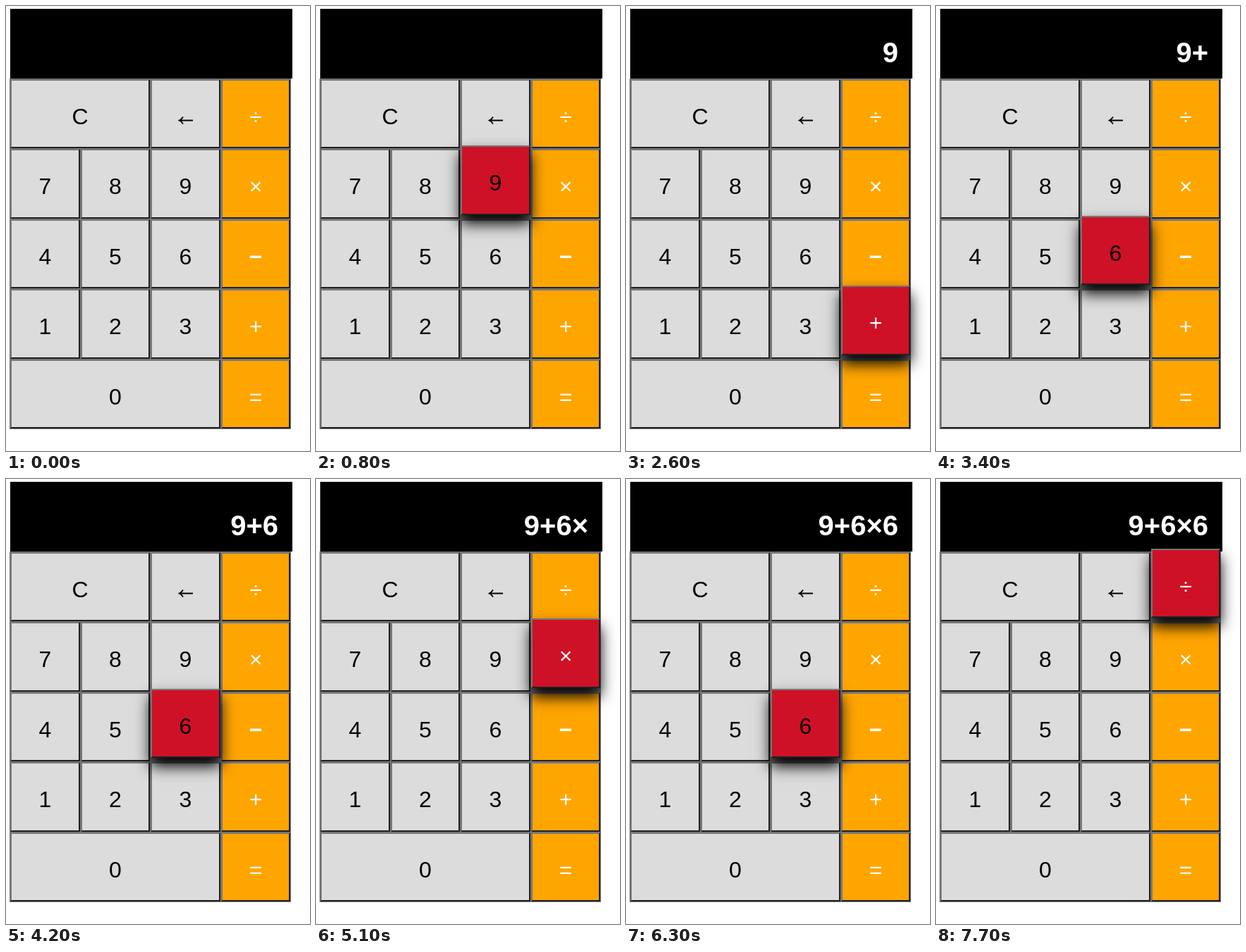
An HTML page for the animation above (8 s loop, 431x632 px).

```html
<!DOCTYPE html>
<html lang="en">
<head>
<meta charset="utf-8">
<title>Calculator</title>
<style>
  html, body { margin: 0; width: 100%; height: 100%; overflow: hidden; background: #fff; }
  body { position: relative; font-family: "Liberation Sans", Arial, sans-serif; }
  #screen {
    position: absolute; left: 6px; top: 4px; width: 380px; height: 99px; padding-right: 20px;
    background: #000; color: #fff; font-size: 40px; font-weight: bold; line-height: 124px; text-align: right;
  }
  #pad { position: absolute; left: 5px; top: 103px; width: 399px; height: 498px; background: #767676; }
  .key {
    position: absolute; box-sizing: border-box; border: 2px outset rgb(118, 118, 118);
    background: #dcdcdc; color: #000; font-size: 32px; line-height: 102px; text-align: center; white-space: nowrap;
  }
  .op { background: #ffa500; color: #fff; }
  .bold { font-weight: bold; }
  .hover { z-index: 1; background: #ce1126; transform: translateY(-5px); box-shadow: 0 12px 20px #000; }
  .press { border-style: inset; }
  .key svg { position: absolute; left: 37px; top: 49px; }
</style>
</head>
<body>
<div id="screen"></div>
<div id="pad"></div>
<script>
const LOOP = 8000;
const colStart = [6, 106, 205, 305], colEnd = [105, 204, 304, 403];
const rowStart = [104, 203, 303, 402, 502], rowEnd = [202, 302, 401, 501, 600];
const rows = ["CC←÷", "789×", "456−", "123+", "000="];
const arrow = '<svg width="22" height="15" fill="none" stroke="#000" stroke-width="1.8">' +
  '<path d="M1.5 7.5H21M7 2.5Q5 6 1.5 7.5Q5 9 7 12.5"/></svg>';

// time, hovered key, pressed, screen text
const steps = [
  [0, "", 0, ""],
  [500, "+", 0, ""],
  [600, "−", 0, ""],
  [800, "9", 0, ""],
  [1900, "9", 1, ""],
  [2000, "9", 0, "9"],
  [2300, "6", 0, "9"],
  [2400, "−", 0, "9"],
  [2600, "+", 0, "9"],
  [3000, "+", 1, "9"],
  [3100, "+", 0, "9+"],
  [3400, "6", 0, "9+"],
  [4100, "6", 1, "9+"],
  [4200, "6", 0, "9+6"],
  [4700, "×", 0, "9+6"],
  [5000, "×", 1, "9+6"],
  [5100, "×", 0, "9+6×"],
  [5300, "−", 0, "9+6×"],
  [5400, "6", 0, "9+6×"],
  [6100, "6", 1, "9+6×"],
  [6300, "6", 0, "9+6×6"],
  [7500, "×", 0, "9+6×6"],
  [7700, "÷", 0, "9+6×6"]
];

const screenBox = document.getElementById("screen");
const pad = document.getElementById("pad");
const keys = {};

rows.forEach((row, r) => {
  for (const label of new Set(row)) {
    const left = colStart[row.indexOf(label)], right = colEnd[row.lastIndexOf(label)];
    const key = document.createElement("div");
    key.className = "key" + ("÷×−+=".includes(label) ? " op" : "") + (label === "−" ? " bold" : "");
    Object.assign(key.style, {
      left: left - 5 + "px", top: rowStart[r] - 103 + "px",
      width: right - left + "px", height: rowEnd[r] - rowStart[r] + "px"
    });
    if (label === "←") key.innerHTML = arrow;
    else key.textContent = label;
    pad.append(key);
    keys[label] = key;
  }
});

let shown = null;
const start = performance.now();

function draw(now) {
  const t = Math.max(0, now - start) % LOOP;
  const step = steps.findLast(s => s[0] <= t);
  if (step !== shown) {
    const [, hovered, pressed, text] = step;
    for (const label in keys) {
      keys[label].classList.toggle("hover", label === hovered);
      keys[label].classList.toggle("press", label === hovered && !!pressed);
    }
    screenBox.textContent = text;
    shown = step;
  }
  requestAnimationFrame(draw);
}
draw(start);
</script>
</body>
</html>
```
